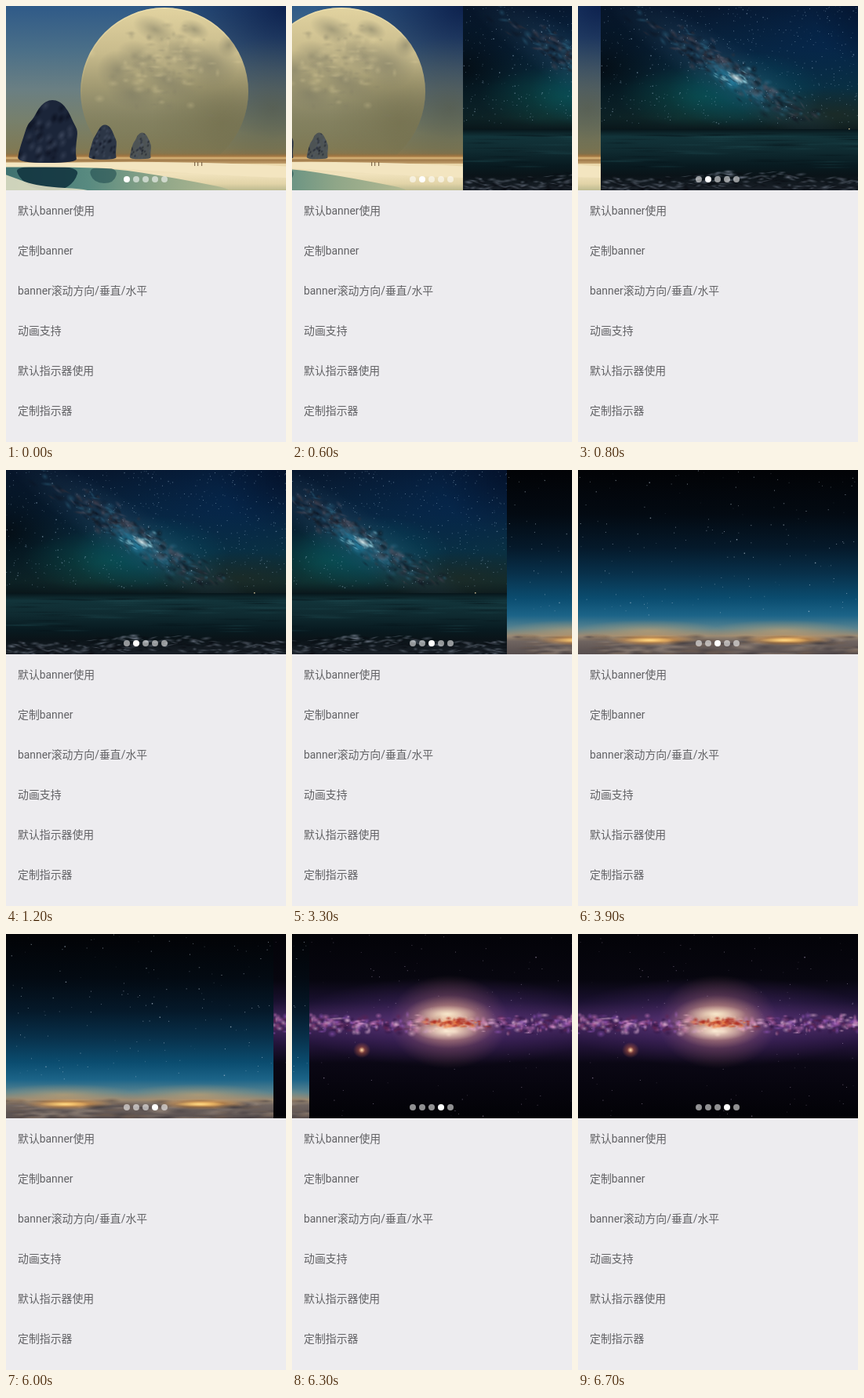
An HTML page with a canvas that plays this animation: 357x556 px, repeating every 8000 ms.

```html
<!DOCTYPE html>
<html lang="zh-CN">
<head>
<meta charset="utf-8">
<title>Banner</title>
<style>
  html, body { margin: 0; width: 100%; height: 100%; overflow: hidden; background: #edecef; }
  #stage { position: relative; width: 357px; height: 556px; overflow: hidden; }
  #banner { position: absolute; left: 0; top: 0; width: 357px; height: 235px; overflow: hidden; }
  #strip { display: block; will-change: transform; }
  #dots i {
    position: absolute; top: 217px; width: 8px; height: 8px;
    border-radius: 50%; background: rgba(255, 255, 255, .56);
  }
  #dots i.on { background: #fff; }
  ul {
    position: absolute; left: 15px; top: 236px; margin: 0; padding: 0; list-style: none;
    font: 13.88px/51px Roboto, "Noto Sans CJK SC", "Noto Sans CJK", sans-serif;
    color: #626265; white-space: nowrap;
  }
</style>
</head>
<body>
<div id="stage">
  <div id="banner">
    <canvas id="strip" width="1428" height="235"></canvas>
    <div id="dots"></div>
  </div>
  <ul>
    <li>默认banner使用</li>
    <li>定制banner</li>
    <li>banner滚动方向/垂直/水平</li>
    <li>动画支持</li>
    <li>默认指示器使用</li>
    <li>定制指示器</li>
  </ul>
</div>
<script>
const W = 357, H = 235;
const strip = document.getElementById('strip');
const g = strip.getContext('2d');

let seed = 7;
function rand(min = 0, max = 1) {
  seed = (seed * 1664525 + 1013904223) >>> 0;
  return min + (max - min) * seed / 4294967296;
}
// Roughly bell-shaped, from -1 to 1
const bell = () => (rand() + rand() + rand()) / 1.5 - 1;

function vertical(y0, y1, stops) {
  const fill = g.createLinearGradient(0, y0, 0, y1);
  stops.forEach(([at, color]) => fill.addColorStop(at, color));
  return fill;
}

function wash(y0, y1, stops) {
  g.fillStyle = vertical(y0, y1, stops);
  g.fillRect(0, y0, W, y1 - y0);
}

function glow(x, y, rx, ry, rgb, alpha, turn = 0) {
  g.save();
  g.translate(x, y);
  g.rotate(turn);
  g.scale(rx, ry);
  const fill = g.createRadialGradient(0, 0, 0, 0, 0, 1);
  fill.addColorStop(0, `rgba(${rgb},${alpha})`);
  fill.addColorStop(.5, `rgba(${rgb},${alpha * .45})`);
  fill.addColorStop(1, `rgba(${rgb},0)`);
  g.fillStyle = fill;
  g.fillRect(-1, -1, 2, 2);
  g.restore();
}

function stars(count, bottom, rgb, strength) {
  for (let i = 0; i < count; i++) {
    const size = rand() < .08 ? 1.4 : .9;
    g.fillStyle = `rgba(${rgb},${rand(.1, strength)})`;
    g.fillRect(rand(0, W), rand(0, bottom), size, size);
  }
}

// Smooth closed outline through a few points
function blob(points, fill) {
  const mid = (a, b) => [(a[0] + b[0]) / 2, (a[1] + b[1]) / 2];
  g.beginPath();
  g.moveTo(...mid(points[points.length - 1], points[0]));
  points.forEach((p, i) =>
    g.quadraticCurveTo(...p, ...mid(p, points[(i + 1) % points.length])));
  g.fillStyle = fill;
  g.fill();
}

function rock(x, w, top, base, color) {
  const shape = [[-.02, 1.04], [0, .86], [.08, .62], [.15, .4], [.25, .3], [.38, .06], [.55, -.03], [.72, .02], [.84, .16], [.93, .36], [1.01, .5], [.98, .7], [.97, .9], [1, 1.04]];
  g.save();
  blob(shape.map(([u, v]) => [x + u * w, top + v * (base - top)]), color);
  g.clip();
  for (let i = 0; i < 60; i++) {
    const light = i % 2;
    glow(x + rand(0, w), rand(top, base), w * .07, w * .1,
      light ? '84,94,116' : '8,12,26', light ? .34 : .5, .5);
  }
  g.restore();
}

function moonBeach() {
  wash(0, H, [[0, '#2f5a88'], [.25, '#4c7088'], [.45, '#6a7f83'], [.62, '#77806c'], [.77, '#7f7a56'], [.82, '#8e7448'], [1, '#8a8058']]);
  glow(357, 0, 190, 170, '10,28,72', .9);
  glow(340, 130, 100, 90, '84,88,70', .6);

  g.save();
  g.beginPath();
  g.arc(202, 109, 107, 0, 7);
  g.clip();
  g.fillStyle = vertical(2, 196, [[0, '#e2d3a0'], [.3, '#c8bb8c'], [.52, 'rgba(168,157,112,.9)'], [.75, 'rgba(140,130,88,.6)'], [1, 'rgba(130,118,72,0)']]);
  g.fillRect(90, 0, 225, 196);
  glow(275, 150, 90, 80, '116,112,78', .7);
  const seas = [[190, 30, 30, 16], [226, 62, 44, 24], [262, 74, 34, 32], [172, 66, 32, 20], [142, 82, 26, 26], [206, 96, 42, 20], [160, 112, 34, 20], [284, 50, 14, 16], [240, 30, 20, 12]];
  seas.forEach(([x, y, rx, ry]) => glow(x, y, rx, ry, '122,120,98', .55, .4));
  for (let i = 0; i < 110; i++) {
    glow(202 + bell() * 105, 75 + bell() * 78, rand(3, 10), rand(2, 7),
      i % 2 ? '232,216,162' : '124,120,98', .24);
  }
  g.restore();
  g.lineWidth = 1.5;
  g.strokeStyle = vertical(0, 130, [[0, 'rgba(244,232,186,.5)'], [1, 'rgba(220,204,140,0)']]);
  g.beginPath();
  g.arc(202, 109, 106, 2.7, 5.6);
  g.stroke();

  wash(188, 203, [[0, 'rgba(150,104,52,0)'], [.25, '#a87c46'], [.4, '#dcb87c'], [.55, '#a07a4a'], [1, '#d0b07c']]);
  wash(201, H, [[0, '#ead6a8'], [.4, '#f0e2bc'], [.75, '#e2d4a8'], [1, '#bdba90']]);
  const water = g.createLinearGradient(0, 0, 300, 0);
  [[0, '#3f7270'], [.35, '#588a80'], [.65, '#8fa688'], [1, '#b9bd94']].forEach(s => water.addColorStop(...s));
  blob([[-60, 205], [40, 204], [130, 206], [215, 219], [320, 240], [100, 245], [-60, 245]], water);
  blob([[12, 204], [94, 204], [88, 224], [70, 236], [34, 234], [16, 218]], 'rgba(16,50,62,.85)');
  blob([[104, 205], [143, 206], [138, 226], [112, 226]], 'rgba(34,78,80,.6)');
  blob([[-40, 199], [60, 200], [200, 198], [400, 205], [400, 222], [230, 213], [110, 205], [-40, 206]], '#f3e5c0');
  blob([[-20, 208], [8, 218], [40, 230], [110, 234], [110, 242], [-20, 242]], 'rgba(222,222,196,.9)');

  rock(16, 75, 121, 197, '#1b2539');
  rock(106, 35, 152, 194, '#2c3646');
  rock(158, 27, 162, 194, '#4d5354');
  g.fillStyle = 'rgba(106,80,54,.8)';
  [240, 244, 249].forEach(x => g.fillRect(x, 199, 1.2, 5));
}

function nightSea() {
  wash(0, 158, [[0, '#07172e'], [.35, '#08253f'], [.65, '#0a313f'], [.9, '#102b2d'], [1, '#0a181c']]);
  glow(290, 40, 170, 110, '4,40,84', .55);
  glow(0, 80, 130, 100, '3,8,14', .85);
  glow(357, 0, 90, 80, '3,14,38', .7);
  glow(130, 116, 110, 40, '8,86,78', .55);
  glow(185, 108, 100, 50, '8,92,116', .6);
  glow(300, 138, 120, 34, '34,42,34', .6);

  const tilt = .56;
  glow(160, 82, 185, 36, '44,74,98', .55, tilt);
  const tones = ['10,16,30', '96,92,108', '50,110,140', '60,48,54', '14,18,28'];
  for (let i = 0; i < 420; i++) {
    const along = bell() * 185, off = bell() * 27;
    const x = 165 + along * Math.cos(tilt) - off * Math.sin(tilt);
    const y = 84 + along * Math.sin(tilt) + off * Math.cos(tilt);
    if (y < 146) glow(x, y, rand(3, 10), rand(1.5, 5), tones[i % 5], .4, tilt + rand(-.5, .5));
  }
  glow(168, 94, 46, 15, '34,150,190', .65, tilt);
  for (let i = 0; i < 50; i++) {
    glow(172 + bell() * 32, 92 + bell() * 14, rand(2, 6), rand(1, 3),
      i % 2 ? '150,214,228' : '18,44,64', .5, tilt);
  }
  glow(173, 92, 13, 5, '232,246,246', .9, tilt);
  stars(650, 150, '180,208,232', .6);

  wash(157, H, [[0, '#07151a'], [.12, '#12343a'], [.35, '#0f2b31'], [.6, '#081a20'], [.76, '#0a1318'], [1, '#1a2028']]);
  for (let i = 0; i < 60; i++) {
    glow(rand(0, W), rand(162, 206), rand(20, 55), rand(.8, 2.2), i % 2 ? '28,70,76' : '4,16,22', .4);
  }
  for (let i = 0; i < 300; i++) {
    const x = rand(0, W);
    const crest = 217 + 8 * Math.pow(x / W - .5, 2) + 4 * Math.sin(x / 40);
    glow(x, crest + rand(-3, 17), rand(3, 10), rand(.8, 2.6), i % 2 ? '126,136,152' : '6,8,14', .45, rand(-.3, .3));
  }
  g.fillStyle = '#c8b890';
  g.fillRect(316, 156, 1.5, 1.5);
}

function cityGlow() {
  wash(0, H, [[0, '#020306'], [.24, '#030a12'], [.42, '#05192a'], [.56, '#08304a'], [.7, '#0b4d70'], [.79, '#1c6488'], [.86, '#5a8490'], [.9, '#9c8a72'], [.93, '#6f6460'], [1, '#574e4e']]);
  stars(150, 185, '200,216,230', .75);
  for (let i = 0; i < 150; i++) {
    glow(rand(0, W), rand(212, 236), rand(7, 24), rand(1.5, 4.5),
      ['150,134,122', '66,60,64', '112,92,78'][i % 3], .5);
  }
  [95, 267].forEach(x => {
    glow(x - 5, 205, 95, 14, '226,170,104', .5);
    glow(x, 217, 58, 7, '255,164,60', .9);
    glow(x - 4, 217, 32, 3.5, '255,224,140', .95);
    glow(x + 40, 221, 26, 4, '48,46,54', .7);
  });
}

function galaxy() {
  wash(0, H, [[0, '#030308'], [.25, '#07060f'], [.37, '#1a1130'], [.48, '#45285f'], [.58, '#27163f'], [.7, '#0a0714'], [1, '#020206']]);
  glow(178, 112, 200, 58, '112,64,148', .5);
  glow(178, 112, 76, 60, '200,124,130', .65);
  for (let i = 0; i < 460; i++) {
    const tone = ['214,130,196', '44,16,62', '156,92,196', '96,30,76', '236,190,220'][i % 5];
    glow(rand(-5, W + 5), 115 + bell() * 15, rand(2, 7), rand(1.5, 5), tone, .55);
  }
  glow(178, 112, 62, 34, '255,206,150', .85);
  glow(176, 102, 38, 11, '255,246,216', .85);
  glow(176, 124, 40, 12, '255,244,220', .9);
  for (let i = 0; i < 70; i++) {
    glow(184 + bell() * 56, 113 + bell() * 8, rand(2, 7), rand(1.5, 4),
      i % 3 ? '176,44,30' : '236,128,70', .7);
  }
  stars(110, H, '220,200,235', .6);
  glow(67, 148, 11, 10, '214,106,70', .8);
  glow(67, 148, 4, 4, '255,226,176', .95);
}

[moonBeach, nightSea, cityGlow, galaxy].forEach((paint, i) => {
  g.save();
  g.translate(i * W, 0);
  g.beginPath();
  g.rect(0, 0, W, H);
  g.clip();
  paint();
  g.restore();
});

const dots = Array.from({ length: 5 }, (_, i) => {
  const dot = document.createElement('i');
  dot.style.left = 150 + i * 12 + 'px';
  return document.getElementById('dots').appendChild(dot);
});

// Viscous scroll: a short run-up, then an exponential settle
function viscous(p) {
  const x = p * 8, knee = Math.exp(-1);
  return x < 1 ? x - 1 + Math.exp(-x) : knee + (1 - Math.exp(1 - x)) * (1 - knee);
}
function ease(p) {
  return viscous(Math.min(1, Math.max(0, p))) / viscous(1);
}

const LOOP = 8000, STEP = 100, SLIDE = 800;
const starts = [496.6, 3223.1, 5968.3];
const origin = performance.now();

function draw(now) {
  const elapsed = Math.max(0, now - origin) % LOOP;
  const t = Math.floor(elapsed / STEP) * STEP;
  const pages = starts.reduce((sum, start) => sum + ease((t - start) / SLIDE), 0);
  const current = starts.filter(start => t >= start).length;
  strip.style.transform = `translateX(${-Math.round(pages * W)}px)`;
  dots.forEach((dot, i) => dot.classList.toggle('on', i === current));
  requestAnimationFrame(draw);
}
draw(origin);
</script>
</body>
</html>
```
